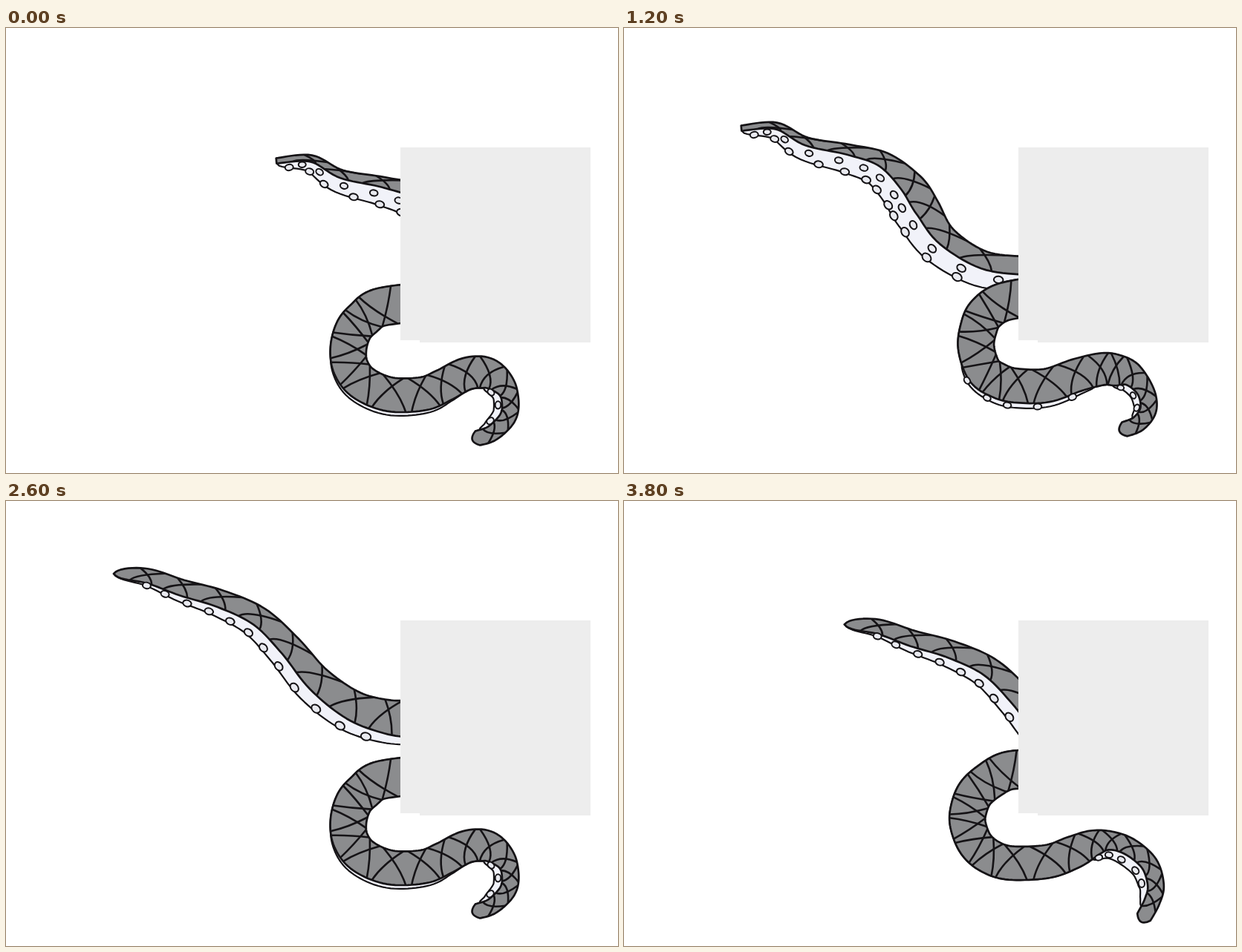
An HTML page that plays this animation: 824 px wide and 600 px high, repeating every 4 s.

```html
<!DOCTYPE html>
<html lang="en">
<head>
<meta charset="utf-8">
<title>Tentacles</title>
<style>
html, body { margin: 0; width: 100%; height: 100%; overflow: hidden; background: #fff; }
svg { display: block; width: 824px; height: 600px; }
path, ellipse { stroke-linejoin: round; stroke-linecap: round; }
.belly, .skin, .line, .cup { stroke: #151316; }
.belly { fill: #f1f2f9; stroke-width: 2.2; }
.skin { fill: #8b8c8e; stroke-width: 2.7; }
.line { fill: none; stroke-width: 2.6; }
.cup { fill: #e9eaf0; stroke-width: 2; }
</style>
</head>
<body>
<svg viewBox="0 0 824 600">
  <g id="arm"></g>
  <g id="leg"></g>
  <path d="M531 161H787V424H557V421H531Z" fill="#ededed"/>
</svg>
<script>
const NS = 'http://www.w3.org/2000/svg';
const $ = id => document.getElementById(id);

function add(parent, tag, attrs) {
  const el = document.createElementNS(NS, tag);
  for (const k in attrs) el.setAttribute(k, attrs[k]);
  parent.appendChild(el);
  return el;
}

const clamp = (x, a, b) => Math.min(b, Math.max(a, x));
const smooth = (a, b, x) => {
  const k = clamp((x - a) / (b - a), 0, 1);
  return k * k * (3 - 2 * k);
};
const arch = (a, b, u) => Math.sin(Math.PI * clamp((u - a) / (b - a), 0, 1));

// Catmull-Rom point at u, where whole numbers are the spine's key points
function along(spine, u) {
  const last = spine.length - 1;
  const i = clamp(Math.floor(u), 0, last - 1), t = u - i;
  const [a, b, c, d] = [-1, 0, 1, 2].map(k => spine[clamp(i + k, 0, last)]);
  return [0, 1].map(j => b[j] + t / 2 * (c[j] - a[j]
    + t * (2 * a[j] - 5 * b[j] + 4 * c[j] - d[j] + t * (3 * (b[j] - c[j]) + d[j] - a[j]))));
}

// half: half width of the skin, belly: how far the pale side sticks out,
// cross: reach of the two arcs that meet at each key point,
// cups: rows of [first, step, count, place on belly, size]
function tentacle(parent, id, { spine, half, belly, cross, cups }) {
  const end = spine.length - 1;
  const heading = u => {
    const p = along(spine, Math.max(0, u - .05)), q = along(spine, Math.min(end, u + .05));
    return Math.atan2(q[1] - p[1], q[0] - p[0]);
  };
  const at = (u, off) => {
    const [x, y] = along(spine, u), a = heading(u);
    return [x - off * Math.sin(a), y + off * Math.cos(a)];
  };
  const side = off => Array.from({ length: end * 10 + 1 }, (_, i) => at(i / 10, off(i / 10)));
  const back = side(u => -half(u)).reverse();
  const under = side(half);
  const [ex, ey] = along(spine, end), a = heading(end), r = half(end) * 1.5;
  const cap = [ex + r * Math.cos(a), ey + r * Math.sin(a)];
  const skin = `M${under.join('L')}Q${cap} ${back.join('L')}Z`;
  const pale = `M${side(u => half(u) + belly(u)).join('L')}L${side(() => 0).reverse().join('L')}Z`;

  const g = add(parent, 'g', { id });
  add(g, 'path', { d: pale, class: 'belly' });
  add(g, 'path', { d: skin, class: 'skin' });
  add(add(g, 'clipPath', { id: id + 'clip' }), 'path', { d: skin });
  const marks = add(g, 'g', { 'clip-path': `url(#${id}clip)` });
  const arc = (u, reach, dir) => {
    const p = at(u - reach, dir * half(u - reach)), q = at(u + reach, -dir * half(u + reach));
    add(marks, 'path', { d: `M${p}Q${at(u - dir * reach * .7, 0)} ${q}`, class: 'line' });
  };
  for (let u = 1; u < end; u++) {
    arc(u, cross[0], 1);
    arc(u, cross[1], -1);
  }
  for (const [first, step, count, place, size] of cups) {
    for (let i = 0; i < count; i++) {
      const u = first + i * step, rx = size + i * .12;
      const [x, y] = at(u, half(u) + place * belly(u));
      add(g, 'ellipse', {
        rx, ry: rx * .75, class: 'cup',
        transform: `translate(${x} ${y}) rotate(${heading(u) * 180 / Math.PI})`
      });
    }
  }
}

const curled = {
  spine: [[158, 135], [205, 132], [246, 153], [302, 164], [350, 178],
    [387, 210], [408, 242], [434, 281], [485, 313], [545, 321]],
  half: u => 3.5 + u + 8 * Math.exp(-(((u - 5.5) / 1.5) ** 2)),
  belly: u => 29 * arch(0, 11, u) ** .6,
  cross: [.48, .2],
  cups: [[.4, .66, 12, .93, 5.5], [.75, .69, 12, .42, 5]]
};

const straight = {
  spine: [[145, 98], [190, 101], [237, 117], [289, 132], [341, 156],
    [383, 196], [421, 241], [468, 276], [514, 291], [550, 294]],
  half: u => (10 + .2 * u * u) * (1 - Math.exp(-3 * u)),
  belly: u => 18 * arch(0, 11, u) ** 1.3,
  cross: [.45, .2],
  cups: [[1.05, .59, 12, .8, 5.5]]
};

const bent = {
  ...straight,
  spine: straight.spine.map(([x, y]) => {
    const k = (550 - x) / 400;
    return [x - 7 * k, y + 6 * k];
  })
};

// Legs thin down at the neck, given as a part of their length
const leg = (neck, spine, belly, cups) => ({
  spine, belly, cups,
  cross: [.4, .45],
  half: u => {
    const t = u / (spine.length - 1);
    return 26 - 7 * t - 9 * smooth(neck, neck + .14, t);
  }
});

const tucked = leg(.66,
  [[550, 370], [502, 377], [482, 391], [468, 407], [461, 432], [464, 457], [481, 479],
    [517, 494], [562, 493], [589, 482], [621, 466], [650, 466], [672, 483],
    [679, 504], [675, 526], [655, 546], [635, 553]],
  u => 5 * arch(4.5, 9.5, u) + 11 * arch(11, 15.7, u) ** .6,
  [[11.7, 1.5, 3, .5, 5]]);

const reaching = leg(.68,
  [[550, 362], [509, 370], [487, 385], [478, 403], [474, 430], [484, 461], [503, 475],
    [527, 482], [569, 482], [610, 468], [643, 460], [661, 461], [683, 467],
    [702, 489], [706, 514], [693, 533], [674, 541]],
  u => 7 * arch(4.5, 9.5, u) ** .6 + 10 * arch(11, 15.2, u) ** .6,
  [[5, .9, 5, .7, 5], [11.6, 1.3, 3, .6, 4.5]]);

const dropped = leg(.58,
  [[550, 361], [516, 364], [492, 377], [473, 394], [464, 416], [463, 436], [473, 462],
    [492, 479], [520, 488], [570, 486], [604, 474], [633, 461], [656, 458],
    [682, 467], [707, 489], [716, 518], [711, 540], [700, 561]],
  u => 15 * arch(10.6, 16.5, u) ** .6,
  [[11, .95, 5, .6, 5]]);

tentacle($('arm'), 'A', curled);
tentacle($('arm'), 'B', straight);
tentacle($('arm'), 'C', bent);
tentacle($('leg'), 'L1', tucked);
tentacle($('leg'), 'L2', reaching);
tentacle($('leg'), 'L3', dropped);

// Poses from 800 ms on, one letter per 200 ms
const ARM = 'CBABCBABCBBBBBBB', LEG = '2321232321122333';

const show = (group, id) => {
  for (const g of $(group).children) g.style.display = g.id === id ? '' : 'none';
};

function render(t) {
  const enter = 1 - Math.min(6, Math.floor(t / 100)) / 6;
  const k = Math.floor((t - 800) / 200);
  const leave = Math.max(0, k - 9);
  show('arm', k < 0 ? 'A' : ARM[k]);
  show('leg', 'L' + (k < 0 ? 1 : LEG[k]));
  $('arm').setAttribute('transform',
    `translate(${206 * enter + 25.3 * leave} ${44 * enter + 11.4 * leave})`);
}

const start = performance.now();
function tick() {
  render((performance.now() - start) % 4000);
  requestAnimationFrame(tick);
}
tick();
</script>
</body>
</html>
```
